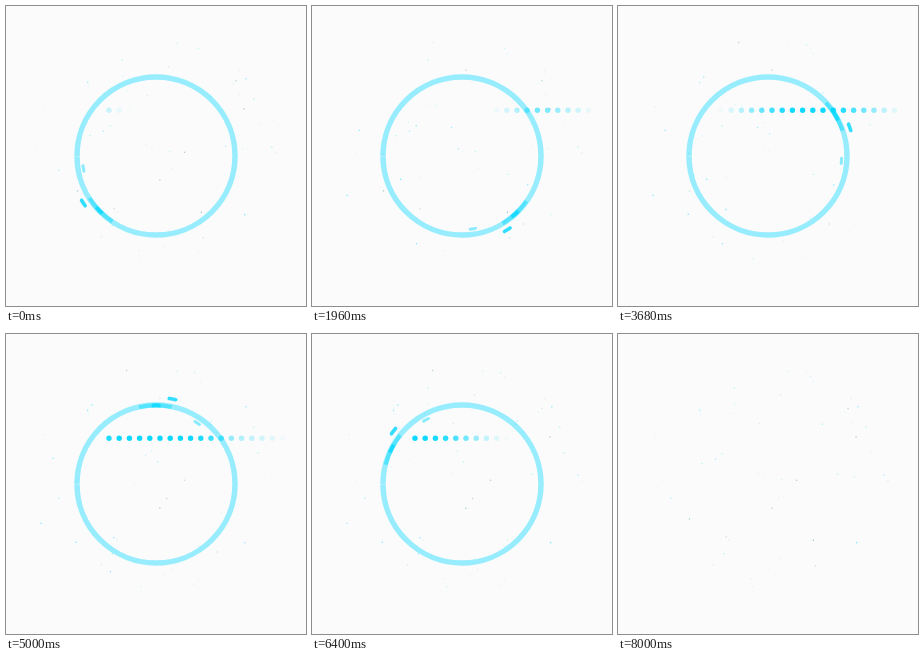
Write an HTML page with a canvas that moves like this. It is 300x300 px and loops after 8.04 s.

```html
<!DOCTYPE html>
<html>
<head>
<meta charset="utf-8">
<style>
html, body { margin: 0; width: 100%; height: 100%; overflow: hidden; background: #fbfbfb; }
canvas { display: block; width: 300px; height: 300px; }
</style>
</head>
<body>
<canvas id="stage" width="300" height="300"></canvas>
<script>
const ctx = document.getElementById('stage').getContext('2d');
const LOOP = 8040, STEP = 40, TURN = 7960, CYCLE = 8;
const CYAN = '#00d7ff', SLATE = '#4f96a4';

const clamp = v => Math.max(0, Math.min(1, v));
const smooth = v => (v = clamp(v), v * v * (3 - 2 * v));

let seed = 7;
const random = () => (seed = seed * 16807 % 2147483647) / 2147483647;

// Specks spread evenly over a disc
const specks = Array.from({ length: 90 }, () => {
  const far = Math.sqrt(random()), angle = random() * 2 * Math.PI;
  return {
    x: 150 + 125 * far * Math.cos(angle),
    y: 146 + 115 * far * Math.sin(angle),
    far,
    phase: random() * CYCLE,
    strength: .1 + .5 * random() ** 2,
    color: random() < .25 ? SLATE : CYAN
  };
});

// Outer specks stay lit longer than inner ones
function drawSpecks(t) {
  for (const { x, y, far, phase, strength, color } of specks) {
    const wave = Math.cos(2 * Math.PI * (t - phase) / CYCLE);
    ctx.globalAlpha = strength * smooth(.2 + far * far + 1.3 * wave);
    ctx.fillStyle = color;
    ctx.fillRect(x - .6, y - .6, 1.2, 1.2);
  }
}

// Degrees run counter-clockwise from the right
function arc(r, middle, half, width, alpha, cap = 'butt') {
  const rad = Math.PI / 180;
  ctx.globalAlpha = alpha;
  ctx.lineWidth = width;
  ctx.lineCap = cap;
  ctx.beginPath();
  ctx.arc(150, 150, r, -(middle + half) * rad, -(middle - half) * rad);
  ctx.stroke();
}

function drawRing(ms) {
  const angle = 224.3 + 360 * ms / TURN;
  ctx.strokeStyle = CYAN;
  arc(79, 0, 180, 5.5, .4);
  arc(78.7, angle, 12, 4, .45);
  arc(78.7, angle - .5, 3.2, 4, .7);
  arc(86.6, angle - 11.4, 2.2, 3.6, .8, 'round');
  arc(73.6, angle - 34.5, 2.1, 3, .45, 'round');
}

// Each dot lights up around its own peak time, later towards the left
function drawRow(t) {
  ctx.fillStyle = CYAN;
  for (let x = 103; x < 283; x += 10.2) {
    const peak = Math.max(3.3, 6 - .0215 * (x - 103));
    const gap = Math.abs(t - peak);
    const away = Math.min(gap, CYCLE - gap);
    ctx.globalAlpha = .95 * clamp((283 - x) / 65) * smooth((1.6 - away) / 1.9 + .5);
    ctx.beginPath();
    ctx.arc(x, 104.3, 2.7, 0, 7);
    ctx.fill();
  }
}

function draw(now) {
  const ms = Math.floor(now % LOOP / STEP) * STEP, t = ms / 1000;
  ctx.globalAlpha = 1;
  ctx.fillStyle = '#fbfbfb';
  ctx.fillRect(0, 0, 300, 300);
  drawSpecks(t);
  if (ms <= TURN) {
    drawRing(ms);
    drawRow(t);
  }
  requestAnimationFrame(() => draw(performance.now() - start));
}

const start = performance.now();
draw(0);
</script>
</body>
</html>
```
